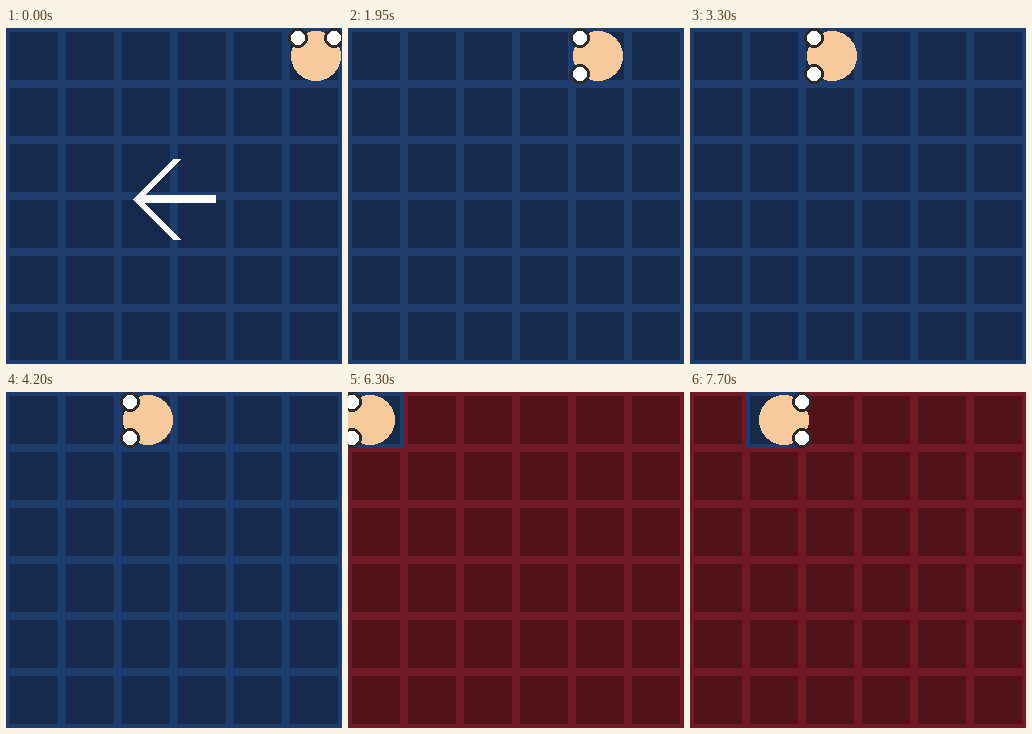
Animation of 336 by 336 pixels, one loop 8 s. Source, as an HTML page:

```html
<!DOCTYPE html>
<html lang="en">
<head>
<meta charset="utf-8">
<title>Grid walk</title>
<style>
  html, body { margin: 0; width: 100%; height: 100%; overflow: hidden; background: #152a4c; }
  svg { display: block; width: 100vw; height: 100vh; shape-rendering: crispEdges; }
  .eye { fill: #fff; stroke: #2b2b2b; stroke-width: 3; }
</style>
</head>
<body>
<svg viewBox="0 0 336 336">
  <defs>
    <pattern id="blue" width="56" height="56" patternUnits="userSpaceOnUse">
      <rect width="56" height="56" fill="#1e3c6c"/>
      <rect x="4" y="4" width="48" height="48" fill="#152a4c"/>
    </pattern>
    <pattern id="red" width="56" height="56" patternUnits="userSpaceOnUse">
      <rect width="56" height="56" fill="#711924"/>
      <rect x="4" y="4" width="48" height="48" fill="#521219"/>
    </pattern>
  </defs>
  <rect id="floor" width="336" height="336" fill="url(#blue)"/>
  <rect id="safe" width="56" height="56" fill="url(#blue)"/>
  <g id="walker">
    <circle r="25" fill="#f9cb9c"/>
    <g id="eyes">
      <circle class="eye" cx="-18" cy="-18" r="8.5"/>
      <circle class="eye" cx="18" cy="-18" r="8.5"/>
    </g>
  </g>
  <path id="arrow" fill="#fff"
    d="M127 171.5L167 131H175L139 167H210V175H139L175 212H167Z"/>
</svg>
<script>
  const LOOP = 8000, TICK = 50, STRIDE = 12, CELL = 56;

  // [start ms, strides, direction]
  const walks = [
    [200, 4, -1], [1950, 5, -1], [3100, 5, -1],
    [4550, 6, -1], [5650, 4, -1], [6700, 6, 1]
  ];
  // [start ms, end ms]
  const alarms = [
    [1100, 1600], [2500, 2800], [3700, 4200],
    [5100, 5400], [6300, 6600], [7500, 8000]
  ];
  // [start ms, end ms, rotation]
  const cues = [[0, 150, 0], [1150, 1300, 0], [3750, 3900, 180], [7550, 7700, 180]];

  const [floor, safe, walker, eyes, arrow] =
    ['floor', 'safe', 'walker', 'eyes', 'arrow'].map(id => document.getElementById(id));
  const active = (spans, t) => spans.find(([from, to]) => t >= from && t < to);
  const set = (el, name, value) => el.setAttribute(name, value);

  function draw(t) {
    let x = 310, turn = 0;
    for (const [start, strides, dir] of walks) {
      if (t < start) break;
      x += dir * STRIDE * Math.min(strides, Math.floor((t - start) / TICK) + 1);
      turn = dir * 90;
    }
    set(walker, 'transform', `translate(${x} 28)`);
    set(eyes, 'transform', `rotate(${turn})`);

    set(floor, 'fill', active(alarms, t) ? 'url(#red)' : 'url(#blue)');
    set(safe, 'x', Math.floor(x / CELL) * CELL);

    const cue = active(cues, t);
    set(arrow, 'visibility', cue ? 'visible' : 'hidden');
    if (cue) set(arrow, 'transform', `rotate(${cue[2]} 168 168)`);
  }

  const began = performance.now();
  function frame() {
    draw((performance.now() - began) % LOOP);
    requestAnimationFrame(frame);
  }
  frame();
</script>
</body>
</html>
```
